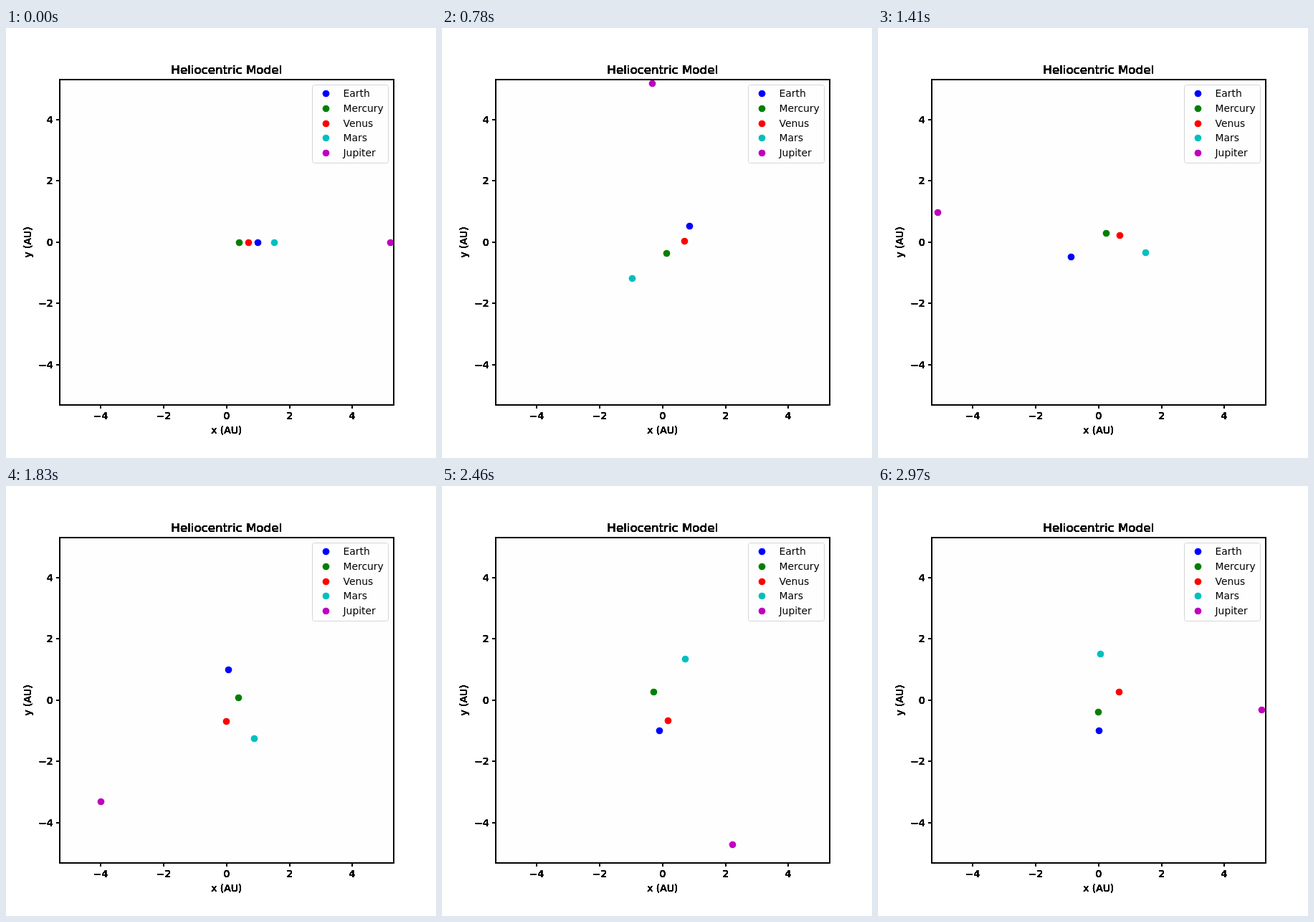
Write an HTML page that moves like this. It is 600 px wide and 600 px high and loops after 3 s.

```html
<!DOCTYPE html>
<html lang="en">
<head>
<meta charset="utf-8">
<title>Heliocentric Model</title>
<style>
  html, body { margin: 0; width: 100%; height: 100%; overflow: hidden; background: #fff; }
  svg { display: block; width: 600px; height: 600px; }
  text { font-family: "DejaVu Sans", sans-serif; font-size: 13.89px; }
</style>
</head>
<body>
<svg id="stage" viewBox="0 0 600 600">
  <clipPath id="inside"><rect x="75" y="72" width="466" height="454"/></clipPath>
  <rect x="75" y="72" width="466" height="454" fill="#fefefe"/>
  <g id="planets" clip-path="url(#inside)"></g>
  <g id="axes"><rect x="75" y="72" width="466" height="454" fill="none" stroke="#000" stroke-width="2"/></g>
  <g id="legend">
    <rect x="427.5" y="79.5" width="106" height="109" rx="2.8" fill="#fff" stroke="#ccc" opacity=".8"/>
  </g>
</svg>
<script>
const STEP_MS = 30, STEPS = 100, DAYS_PER_STEP = 43.33;
const CENTER = { x: 308, y: 299 }, SCALE = { x: 43.87, y: 42.77 };
const LEGEND_SHIFT = -345;

// radius in AU, period in days
const planets = [
  { name: 'Earth', color: '#0000ff', radius: 1, period: 365 },
  { name: 'Mercury', color: '#008000', radius: 0.39, period: 88 },
  { name: 'Venus', color: '#ff0000', radius: 0.7, period: 225 },
  { name: 'Mars', color: '#00bfbf', radius: 1.52, period: 687 },
  { name: 'Jupiter', color: '#bf00bf', radius: 5.2, period: 4333 }
];

const byId = id => document.getElementById(id);
const legend = byId('legend'), axes = byId('axes');

function add(parent, tag, attrs, content = '') {
  const el = document.createElementNS('http://www.w3.org/2000/svg', tag);
  for (const key in attrs) el.setAttribute(key, attrs[key]);
  el.textContent = content;
  parent.append(el);
  return el;
}

const addDot = (parent, color, x = 0, y = 0) =>
  add(parent, 'circle', { cx: x, cy: y, r: 4.86, fill: color });

// Overprinting the text darkens its antialiased edges.
function addInkedText(content, attrs) {
  for (let i = 0; i < 12; i++) add(axes, 'text', attrs, content);
}

const toX = au => CENTER.x + au * SCALE.x;
const toY = au => CENTER.y - au * SCALE.y;
const snapTick = v => Math.floor(v + 0.3);

function buildAxes() {
  for (const v of [-4, -2, 0, 2, 4]) {
    const x = snapTick(toX(v)), y = snapTick(toY(v));
    const label = String(v).replace('-', '\u2212');
    add(axes, 'path', { d: `M${x} 526V531M75 ${y}H70`, stroke: '#000', 'stroke-width': 2 });
    addInkedText(label, { x, y: 546, 'text-anchor': 'middle' });
    addInkedText(label, { x: 65.6, y: y + 5, 'text-anchor': 'end' });
  }
  addInkedText('Heliocentric Model', { x: 307.7, y: 64, 'text-anchor': 'middle', style: 'font-size:16.67px' });
  addInkedText('x (AU)', { x: 307.7, y: 566, 'text-anchor': 'middle' });
  addInkedText('y (AU)', { transform: 'translate(35 299) rotate(-90)', 'text-anchor': 'middle' });
}

function buildPlanets() {
  planets.forEach((planet, i) => {
    planet.dot = addDot(byId('planets'), planet.color);
    const y = Math.floor(91.6 + 20.7 * i);
    addDot(legend, planet.color, 446.5, y + 0.5);
    add(legend, 'text', { x: 470.5, y: y + 5 }, planet.name);
  });
}

function render(time) {
  const step = Math.floor(time / STEP_MS) % STEPS;
  let covered = false;
  for (const { dot, radius, period } of planets) {
    const angle = 2 * Math.PI * step * DAYS_PER_STEP / period;
    const x = toX(radius * Math.cos(angle)), y = toY(radius * Math.sin(angle));
    dot.setAttribute('cx', Math.floor(x) + 0.5);
    dot.setAttribute('cy', Math.floor(y) + 0.5);
    covered = covered || (x > 427 && x < 534 && y > 79 && y < 189);
  }
  // The legend moves left while a planet is in its usual corner.
  legend.setAttribute('transform', `translate(${covered ? LEGEND_SHIFT : 0} 0)`);
}

function tick(now) {
  render(now);
  requestAnimationFrame(tick);
}

buildAxes();
buildPlanets();
render(0);
requestAnimationFrame(tick);
</script>
</body>
</html>
```
